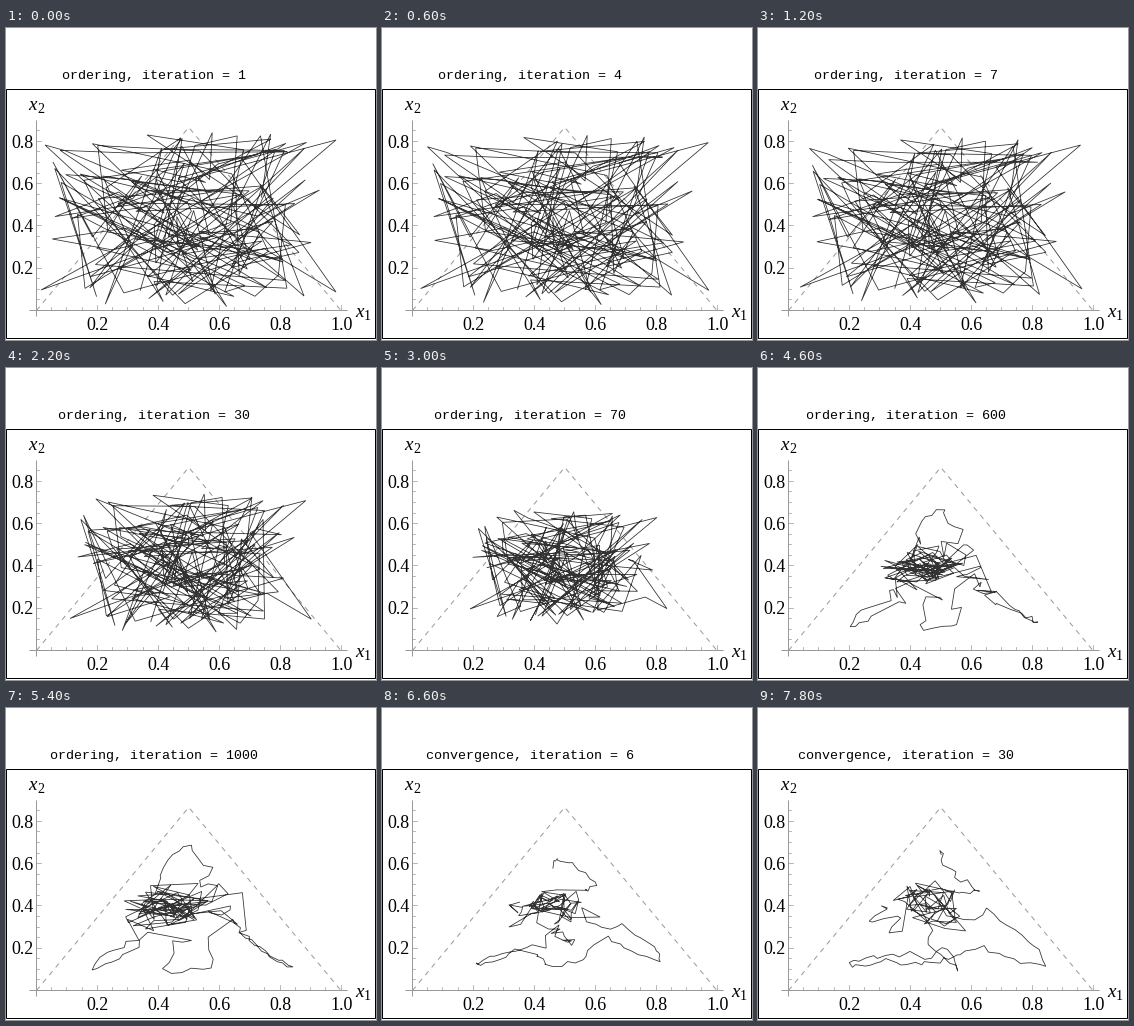
Recreate the animation shown at these times as a matplotlib script. Size 370x312 px, loop 8 s.

```python
import numpy as np
import matplotlib.pyplot as plt
from matplotlib.animation import FuncAnimation
from matplotlib.patches import Rectangle

W, H, DPI = 370, 312, 100
X0, Y0, UX, UY = 30.5, 282.5, 304.5, 211.5
GREY = "#999999"
rng = np.random.default_rng(12)

# The chain: a branch to each corner of the triangle and two tangled stretches.
SIZES = {"top": 18, "knot": 48, "right": 24, "bottom": 14, "left": 18, "tail": 48}
N = sum(SIZES.values())


def px(size):
    return size * 72 / DPI


def tangle(n, x0, x1, y0, y1):
    """Random zigzag; averaging neighbours keeps the steps short."""
    p = rng.uniform((x0, y0), (x1, y1), (n + 1, 2))
    return 0.7 * p[1:] + 0.3 * p[:-1]


def trace(n, *points, jitter=2.5):
    """n even samples along a polyline, slightly shaken."""
    p = np.array(points, float)
    d = np.r_[0, np.cumsum(np.hypot(*np.diff(p, axis=0).T))]
    s = np.linspace(0, d[-1], n)
    q = np.c_[np.interp(s, d, p[:, 0]), np.interp(s, d, p[:, 1])]
    return q + rng.uniform(-jitter, jitter, q.shape)


# Random start, with a few far corners fixed
start = np.array([45, 104]) + rng.beta(1.15, 1.15, (N, 2)) * [275, 176]
corners = [(39, 117), (330, 112), (330, 264), (35, 262), (54, 170)]
start[9::36] = corners

# End of the ordering phase
ordered = dict(
    top=trace(18, (150, 180), (157, 155), (182, 135), (191, 148), (206, 160),
              (196, 178), (213, 175)),
    knot=np.vstack([tangle(44, 108, 236, 170, 226),
                    [(137, 184), (195, 189), (241, 184), (242, 222)]]),
    right=trace(24, (238, 226), (262, 245), (287, 261), (262, 250), (228, 212)),
    bottom=trace(14, (203, 232), (211, 261), (165, 264), (153, 260), (168, 245),
                 (165, 236), (188, 235)),
    left=trace(18, (140, 228), (121, 246), (84, 262), (98, 247), (132, 231)),
    tail=tangle(48, 108, 206, 170, 230),
)

# Convergence phase: top trail, hump to the right tip, long way back to the left
settled = dict(
    top=trace(18, (183, 148), (188, 141), (187, 155), (202, 170), (219, 182),
              (200, 186), jitter=4),
    knot=tangle(48, 134, 208, 168, 224),
    right=trace(24, (190, 210), (215, 211), (230, 200), (252, 218), (281, 241),
                (289, 260), (256, 253), (225, 239)),
    bottom=trace(14, (215, 241), (172, 256), (138, 255)),
    left=trace(18, (130, 251), (91, 260), (92, 253), (153, 245)),
    tail=np.vstack([trace(16, (166, 252), (190, 240), (203, 263), (167, 235),
                          (177, 222)),
                    tangle(20, 128, 196, 172, 222),
                    trace(12, (146, 224), (128, 226), (145, 208), (107, 216),
                          (132, 200), (122, 195), (128, 203), jitter=3)]),
)

# Contracted tangle; the heart of each branch already gathers in a cluster
mid = np.array([179, 199]) + 0.42 * (start - [183, 192]) + rng.normal(0, 7, (N, 2))
mid[:, 1] = np.clip(mid[:, 1], 164, 238)
first = 0
for name, n in SIZES.items():
    if name not in ("knot", "tail"):
        part = slice(first + n // 4, first + 3 * n // 4)
        hub = 0.9 * ordered[name].mean(axis=0) + 0.1 * np.array([180, 200])
        mid[part] = hub + rng.uniform(-1, 1, mid[part].shape) * [17, 10]
    first += n

ordered = np.vstack([ordered[k] for k in SIZES])
settled = np.vstack([settled[k] for k in SIZES])

FINE = [*range(1, 11), 20, 30]
STEPS = [("ordering", n) for n in [*FINE, *range(40, 101, 10), *range(200, 1001, 100)]]
STEPS += [("convergence", n) for n in FINE]


def approach(p, goal, n, tau):
    return goal + (p - goal) * np.exp(-max(n, 0) / tau)


def chain(phase, n):
    done = phase == "convergence"
    k = 1000 if done else n
    p = approach(start, mid, k - 1, 66)
    p = approach(p, ordered, k - 200, 250)
    return approach(p, settled, n, 6) if done else p


fig = plt.figure(figsize=(W / DPI, H / DPI), dpi=DPI, facecolor="white")
ax = fig.add_axes([0, 0, 1, 1])
ax.set(xlim=(0, W), ylim=(H, 0))
ax.axis("off")


def stroke(x, y, color=GREY, width=1.0, **kw):
    return ax.plot(x, y, color=color, lw=px(width), snap=False, **kw)[0]


def label(x, y, s, size=18, **kw):
    ax.text(x, y, s, fontsize=px(size), family="Liberation Serif",
            va="baseline", **kw)


ax.add_patch(Rectangle((0.5, 61.5), 369, 249, fill=False, ec="black",
                       lw=px(1), snap=False))
stroke([X0, X0 + UX / 2, X0 + UX], [Y0, Y0 - UY * 0.866, Y0], dashes=(5, 5))
stroke([24, 341], [Y0, Y0])
stroke([X0, X0], [93, 288])
for k in range(21):
    x, size = np.floor(X0 + UX * k / 20) + 0.5, 3 if k % 4 else 5
    stroke([x, x], [Y0, Y0 - size], width=0.7)
    if k and k % 4 == 0:
        label(x, 302, f"{k / 20:.1f}", ha="center")
for k in range(18):
    y, size = np.floor(Y0 - UY * k / 20) + 0.5, 3 if k % 4 else 5
    stroke([X0, X0 + size], [y, y], width=0.7)
    if k and k % 4 == 0:
        label(28, y + 6, f"{k / 20:.1f}", ha="right")
for x, y, n in [(349, 289, "1"), (22.5, 82, "2")]:
    label(x, y, "x", 19, style="italic")
    label(x + 8.5, y + 3, n, 14)

caption = ax.text(148, 51, "", fontsize=px(13.33), family="Liberation Mono",
                  ha="center", va="baseline")
path = stroke([], [], "black", 0.8, alpha=0.8, solid_joinstyle="miter")


def draw(i):
    phase, n = STEPS[i]
    path.set_data(*chain(phase, n).T)
    caption.set_text(f"{phase}, iteration = {n}")
    return path, caption


anim = FuncAnimation(fig, draw, frames=len(STEPS), interval=200,
                     repeat=True, repeat_delay=0)
plt.show()
```
